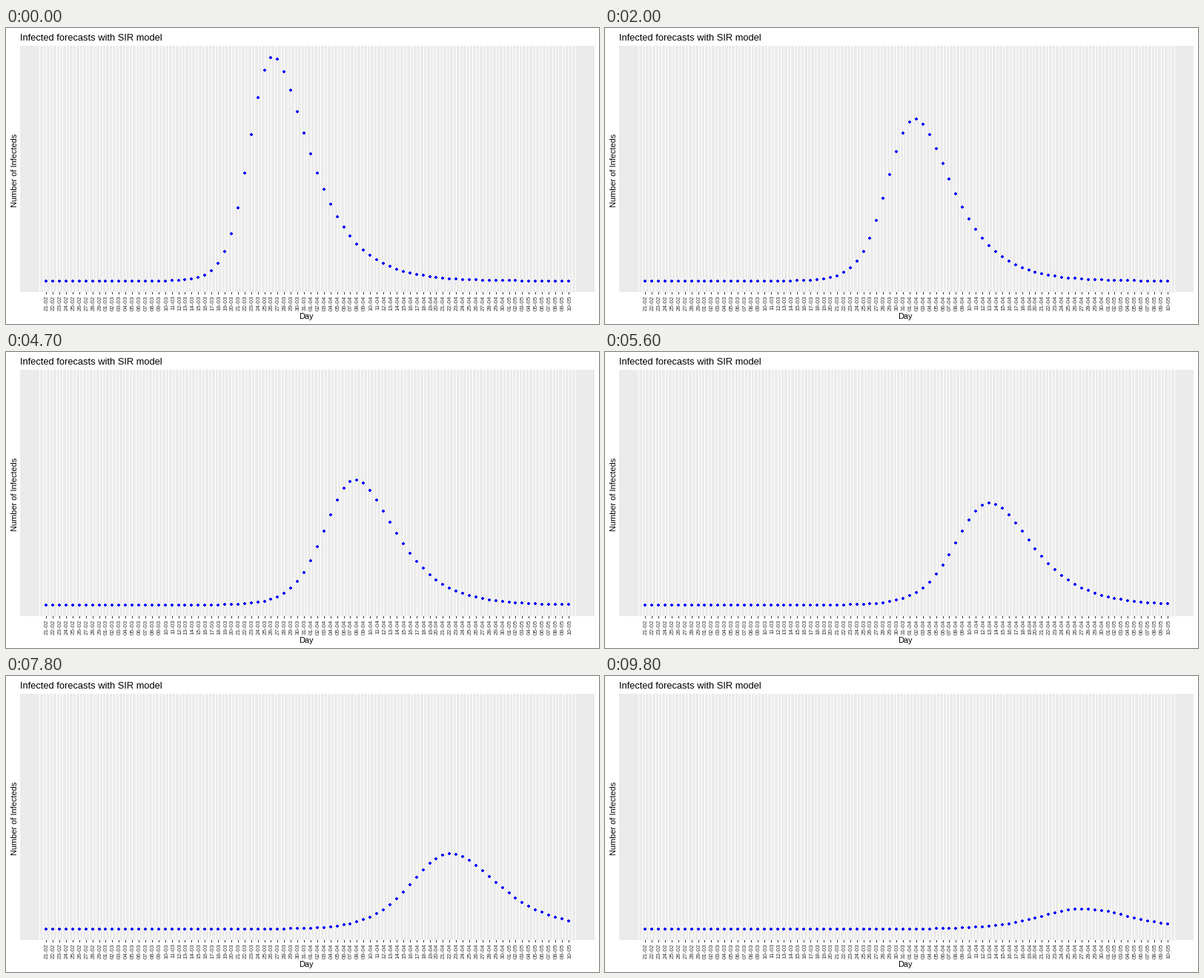
Recreate the animation shown at these times as a matplotlib script. Size 800 by 400 pixels, loop 10 s.

```python
import numpy as np
import matplotlib.pyplot as plt
from matplotlib.animation import FuncAnimation
from matplotlib.collections import PolyCollection

W, H, DPI = 800, 400, 100
LEFT, RIGHT, TOP, BOTTOM = 19, 794, 24, 357
BASE, POP, SEED = 342, 860, 2.27e-8
STATES = 39

plt.rcParams["font.family"] = "Liberation Sans"

months = ((2, 21, 29), (3, 1, 31), (4, 1, 30), (5, 1, 10))
labels = [f"{d:02d}-{m:02d}" for m, a, b in months for d in range(a, b + 1)]
days = np.arange(len(labels))


def day_x(d):
    return np.round(54.15 + 8.92 * np.asarray(d))


def peaks(k):
    """Height and day of each forecast's peak: lower peaks come later."""
    early = np.interp(k, [0, 7, 12, 14, 19, 24, 28],
                      [303, 219, 192, 190, 138, 121, 102])
    late = 42 - 1.84 * (k - 30)
    return np.where(k < 30,
                    (early, 34.37 * (303 / early) ** 0.53),
                    (late, 66.3 * (27.3 / late) ** 0.4))


def sir_curves():
    """SIR runs from one seed, with time scaled to hit each peak day."""
    height, peak_day = peaks(np.arange(STATES))
    r = np.linspace(1.01, 5, 4000)
    r0 = np.interp(height / POP, 1 - (1 + np.log(r)) / r, r)

    def infected(u):  # u is the log of the susceptible share
        return SEED - np.expm1(u) + u / r0

    t = np.arange(0, 70, 0.01)
    u = np.zeros((len(t), STATES))
    for n in range(len(t) - 1):
        mid = u[n] - 0.005 * r0 * infected(u[n])
        u[n + 1] = u[n] - 0.01 * r0 * infected(mid)
    share = infected(u)
    rate = [np.interp(np.log(r0[k]), -u[:, k], t) / peak_day[k]
            for k in range(STATES)]
    return [POP * np.interp(days * rate[k], t, share[:, k])
            for k in range(STATES)]


def state_at(i):
    """New forecast every three ticks, then every two."""
    if i < 2:
        return 0
    return 1 + (i - 2) // 3 if i < 68 else 23 + (i - 68) // 2


fig = plt.figure(figsize=(W / DPI, H / DPI), dpi=DPI, facecolor="white")
ax = fig.add_axes([0, 0, 1, 1])
ax.set_xlim(0, W)
ax.set_ylim(H, 0)
ax.axis("off")


def text(x, y, s, px, **kw):
    ax.text(x, y, s, fontsize=px * 72 / DPI, va="baseline",
            rotation_mode="anchor", **kw)


def polygons(verts, color, z):
    shapes = PolyCollection(verts, facecolor=color, edgecolor="none",
                            lw=0, zorder=z)
    ax.add_collection(shapes, autolim=False)
    return shapes


def box(x, y0, y1, w=1):
    return [(x, y0), (x + w, y0), (x + w, y1), (x, y1)]


polygons([box(LEFT, TOP, BOTTOM, RIGHT - LEFT)], "#EBEBEB", 1)
polygons([box(x, TOP, BOTTOM) for x in day_x(np.arange(-1, 80.5, 0.5))],
         "white", 2)
polygons([box(x, BOTTOM, BOTTOM + 3) for x in day_x(days)], "#333333", 2)

text(LEFT, 17, "Infected forecasts with SIR model", 12.9)
text(405, 393, "Day", 11, ha="center")
text(15.5, 192, "Number of Infecteds", 11, ha="center", rotation=90)
for x, s in zip(day_x(days), labels):
    text(x + 3, 371.5, s, 8, ha="center", rotation=90, color="#333333")

# Four pixel dot with its corners cut off
quarter = np.array([(2, -1), (2, 1), (1, 1)])
turn = np.array([(0, 1), (-1, 0)])
DOT = np.vstack([quarter @ np.linalg.matrix_power(turn, q) for q in range(4)])
dots = polygons([], "#0000FF", 3)
curves = sir_curves()


def draw(i):
    y = np.round(BASE - curves[state_at(i)])
    centers = np.column_stack([day_x(days), y])
    dots.set_verts(centers[:, None] + DOT)
    return dots,


anim = FuncAnimation(fig, draw, frames=100, interval=100, repeat=True,
                     repeat_delay=0, blit=False)
plt.show()
```
